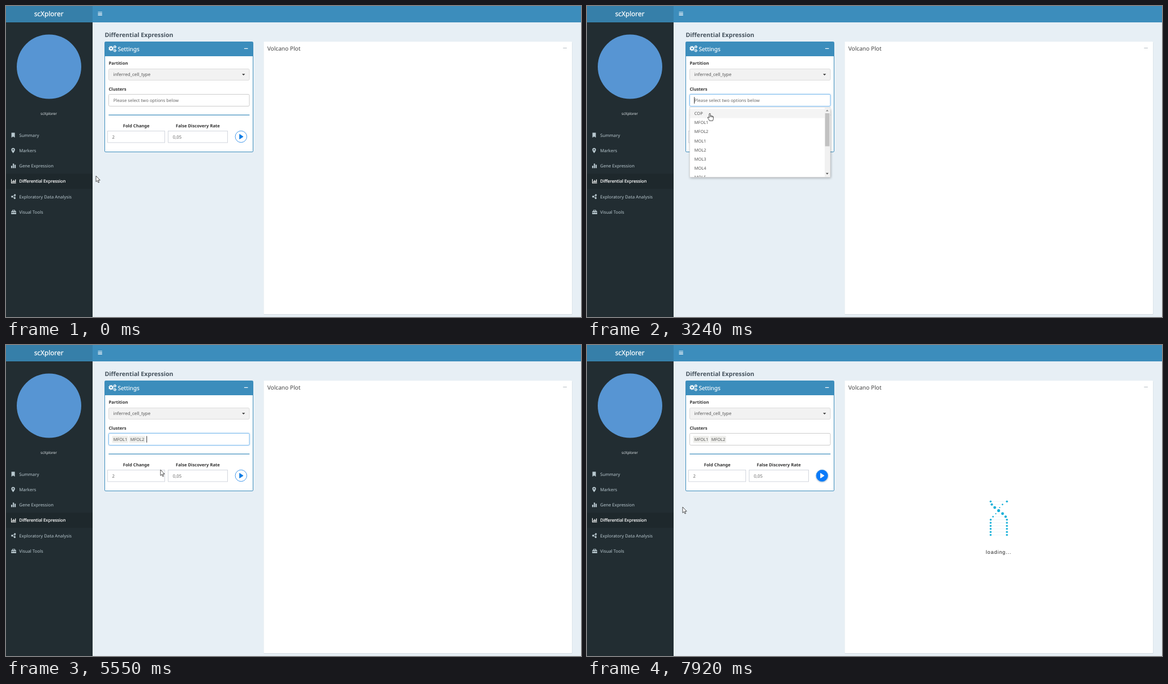
Animation of 1016 by 551 pixels, one loop 7.99 s. Source, as an HTML page:

```html
<!DOCTYPE html>
<html lang="en">
<head>
<meta charset="utf-8">
<title>Differential Expression</title>
<style>
html, body { margin: 0; width: 100%; height: 100%; overflow: hidden; background: #e7eff5; }
svg { display: block; width: 100vw; height: 100vh; }
text { font-family: "Noto Sans", "Open Sans", sans-serif; text-rendering: geometricPrecision; white-space: pre; }
.menu { font-size: 7.75px; fill: #b8c7ce; }
.menu.on { fill: #fff; stroke: #fff; stroke-width: .18; }
.label { font-size: 7.65px; font-weight: 700; fill: #333; }
.value { font-size: 7.75px; fill: #666; }
.option { font-size: 7.45px; fill: #555; }
.icon { fill: #b8c7ce; stroke: none; }
.field { fill: #fff; stroke: #d2d6de; }
</style>
</head>
<body>
<svg viewBox="0 0 1016 551" preserveAspectRatio="none">
  <defs>
    <filter id="soft" x="-20%" y="-20%" width="140%" height="150%"><feGaussianBlur stdDeviation="2.2"/></filter>
    <filter id="glow" x="-10%" y="-50%" width="120%" height="200%"><feGaussianBlur stdDeviation="1.1"/></filter>
    <clipPath id="listClip"><rect x="181" y="180" width="249" height="122.8"/></clipPath>
  </defs>

  <rect width="1016" height="551" fill="#e7eff5"/>
  <rect width="1016" height="29" fill="#3c8dbc"/>
  <rect y="29" width="153" height="522" fill="#222d32"/>
  <rect width="153" height="29" fill="#367fa9"/>
  <text x="49.7" y="18" font-size="11.8" fill="#fff" stroke="#fff" stroke-width=".25">scXplorer</text>
  <path d="M162.5 11h7.3M162.5 13.6h7.3M162.5 16.2h7.3" stroke="#fff" stroke-width="1.2"/>

  <circle cx="76" cy="107.5" r="57" fill="#5795d3"/>
  <text x="61" y="193.3" font-size="6.6" fill="#dfe5e8">scXplorer</text>
  <rect y="297" width="153" height="27" fill="#1e282c"/>
  <g id="menu"></g>
  <g class="icon">
    <path d="M9.6 224.6h6v8.6l-3-1.9-3 1.9z"/>
    <path fill-rule="evenodd" d="M12.6 260.8Q9.4 256.9 9.4 254.8A3.2 3.2 0 0 1 15.8 254.8Q15.8 256.9 12.6 260.8ZM12.6 253.5a1.2 1.2 0 1 0 .01 0z"/>
    <path d="M9 283h2.2v4.3H9zM12 279.2h2.2v8.1H12zM15 281.3h2.2v6H15z"/>
    <path fill="#fff" d="M9 306.7h1.1v6.5h7.6v1.1H9zM11 310.3h1.2v2.2H11zM12.7 308.6h1.2v3.9h-1.2zM14.4 309.7h1.2v2.8h-1.2zM16.1 307.2h1.2v5.3h-1.2z"/>
    <path d="M10.8 337.8L15.7 334.9L15.4 340.4Z" fill="none" stroke="#b8c7ce"/>
    <circle cx="10.8" cy="337.8" r="1.7"/><circle cx="15.7" cy="334.9" r="1.6"/><circle cx="15.4" cy="340.4" r="1.6"/>
    <path fill-rule="evenodd" d="M11.2 363v-1.8h4.8V363h1.2l.8 1.2V365H9.2v-.8L10 363zM12.2 363h2.8v-.9h-2.8zM9.2 365.8h2v.8h1v-.8h2.8v.8h1v-.8h2v3H9.2z"/>
  </g>

  <text x="174.5" y="54.6" font-size="10.65" font-weight="600" fill="#46535e">Differential Expression</text>

  <rect x="455.5" y="64" width="545" height="483" rx="1" fill="#d3dae0"/>
  <rect x="455.5" y="63.2" width="544.5" height="482.8" rx="1" fill="#fff"/>
  <text x="461.7" y="78.6" font-size="10.15" fill="#444">Volcano Plot</text>
  <path d="M984.3 74.5h6.6" stroke="#b5bbc2"/>

  <rect x="174.5" y="63.5" width="262" height="195" rx="1.6" fill="#fff" stroke="#3c8dbc"/>
  <rect x="175" y="64" width="261" height="25" fill="#3c8dbc"/>
  <g fill="none" stroke="#fff">
    <circle cx="185.6" cy="75.2" r="2.5" stroke-width="2.1"/>
    <circle cx="185.6" cy="75.2" r="3.9" stroke-width="1.3" stroke-dasharray="1.55 1.51"/>
    <circle cx="192.3" cy="72.4" r="1.5" stroke-width="1.2"/>
    <circle cx="192.3" cy="72.4" r="2.4" stroke-width=".9" stroke-dasharray="1.26 1.25"/>
    <circle cx="192.3" cy="79" r="1.5" stroke-width="1.2"/>
    <circle cx="192.3" cy="79" r="2.4" stroke-width=".9" stroke-dasharray="1.26 1.25"/>
    <path d="M420.9 75.4h6.5" stroke-width="1.2"/>
  </g>
  <text x="197.4" y="79.5" font-size="10.1" fill="#fff" stroke="#fff" stroke-width=".15">Settings</text>

  <text class="label" x="181.5" y="104.4">Partition</text>
  <rect x="181.5" y="111.5" width="248.5" height="20" rx="2" fill="#f2f2f2" stroke="#dcdcdc"/>
  <text class="value" x="189.6" y="124.3" style="font-size:7.95px;fill:#555">inferred_cell_type</text>
  <path d="M417 120.2h5.4l-2.7 2.8z" fill="#333"/>

  <text class="label" x="181.5" y="150.2">Clusters</text>
  <rect id="halo" x="181.5" y="156.5" width="248.5" height="21" rx="2" fill="none" stroke="#66afe9" stroke-width="1.6" opacity=".55" filter="url(#glow)"/>
  <rect id="box" x="181.5" y="156.5" width="248.5" height="21" rx="2" fill="#fff"/>
  <text id="hint" class="value" x="189.8" y="170">Please select two options below</text>
  <g id="chips"></g>
  <rect id="caret" y="161.3" width="1" height="11.6" fill="#333"/>

  <path d="M181.3 193.1H430.3" stroke="#3c8dbc" stroke-width="1.1"/>
  <text class="label" x="206.7" y="215">Fold Change</text>
  <text class="label" x="300" y="215">False Discovery Rate</text>
  <rect class="field" x="179.5" y="221.5" width="101" height="20.5"/>
  <rect class="field" x="286.5" y="221.5" width="105" height="20.5"/>
  <text class="value" x="187.4" y="235">2</text>
  <text class="value" x="294.8" y="235">0,05</text>

  <circle id="shade" cx="415.3" cy="232.4" r="10.9" fill="#5b7fa8" opacity=".45" filter="url(#glow)"/>
  <circle id="button" cx="415.3" cy="231.5" r="10.2" stroke="#2f8ee8" stroke-width=".9"/>
  <path id="play" d="M412.2 227.4Q412.2 226.6 413 227L419 230.9Q419.7 231.5 419 232.1L413 235.9Q412.2 236.3 412.2 235.5Z"/>

  <g id="list">
    <rect x="182" y="183" width="249" height="122" fill="#000" opacity=".28" filter="url(#soft)"/>
    <rect x="181.5" y="179.5" width="248.3" height="123.7" fill="#fff" stroke="#d4d4d4" stroke-width=".7"/>
    <rect id="active" x="182" width="238" height="16.2" fill="#f4f4f4"/>
    <g id="options" clip-path="url(#listClip)"></g>
    <rect x="420" y="180" width="9.4" height="122.8" fill="#f1f1f1"/>
    <rect id="thumb" x="420.7" y="190" width="7.8" fill="#c1c1c1"/>
    <path d="M422 186.5h4.8l-2.4-2.7z" fill="#8a8a8a"/>
    <path d="M422 295.8h4.8l-2.4 2.7z" fill="#505050"/>
  </g>

  <g id="loader">
    <g id="rows"></g>
    <text x="704.7" y="369.8" font-size="9" letter-spacing=".9" fill="#222" style="font-family:'Liberation Sans',Arial,sans-serif">loading...</text>
  </g>

  <g id="cursor">
    <path id="arrow" d="M0 0V10.4L2.4 8.2L4 12L5.6 11.3L4 7.6H7.2Z" fill="#fff" stroke="#222" stroke-width=".8"/>
    <path id="beam" d="M-2.3 -5Q-.4 -5 0 -4Q.4 -5 2.3 -5M0 -4V4M-2.3 5Q-.4 5 0 4Q.4 5 2.3 5" fill="none" stroke="#222" stroke-width=".9"/>
    <path id="hand" d="M-1.1 1.1Q0 -.9 1.1 1.1V4.6Q2.4 3.9 3.2 5Q4.4 4.4 5 5.5Q6.3 5.2 6.3 6.8V9.5Q6 11.5 5.2 13.3H-.6Q-1.5 11 -3.8 8Q-3.9 6.4 -2.2 7L-1.1 8.2ZM1.1 4.6V7M3.2 5V7.2M5 5.5V7.4" fill="#fff" stroke="#222" stroke-width=".8"/>
  </g>
</svg>
<script>
const LOOP = 7990, OPEN = 2160, PICK1 = 4130, PICK2 = 5080, HOVER = 6250, CLICK = 6870, LOAD = 6930;
const ROW = 16.1, DNA_ROWS = 12, BLINK = 530;
const $ = id => document.getElementById(id);

function add(parent, tag, attrs, text) {
  const el = document.createElementNS('http://www.w3.org/2000/svg', tag);
  set(el, attrs);
  if (text) el.textContent = text;
  return parent.appendChild(el);
}
function set(el, attrs) {
  for (const k in attrs) el.setAttribute(k, attrs[k]);
}
const show = (el, on) => el.setAttribute('visibility', on ? 'visible' : 'hidden');
const clamp = v => Math.max(0, Math.min(1, v));
const mix = (a, b, k) => a + (b - a) * k;

// time, x, y, cursor shape
const path = [
  [0, 159, 301, 'arrow'], [1000, 159, 301, 'arrow'], [1130, 176, 285, 'arrow'],
  [1270, 228, 238, 'arrow'], [1400, 258, 197, 'arrow'], [1480, 250, 176, 'beam'],
  [1560, 226, 167, 'beam'], [1630, 215, 165, 'beam'], [2290, 215, 165, 'beam'],
  [2360, 211, 163, 'beam'], [2620, 211, 163, 'beam'], [2760, 212, 167, 'beam'],
  [2960, 215, 181, 'hand'], [3240, 217, 190, 'hand'], [3450, 217, 197, 'hand'],
  [3800, 216, 204, 'hand'], [PICK2, 216, 204, 'arrow'], [5340, 216, 204, 'arrow'],
  [5410, 222, 206, 'arrow'], [5550, 273, 221, 'arrow'], [5750, 330, 246, 'arrow'],
  [5950, 380, 249, 'arrow'], [6180, 405, 243, 'arrow'], [HOVER, 409, 238, 'hand'],
  [6500, 411, 232, 'hand'], [7000, 411, 232, 'hand'], [7070, 400, 238, 'arrow'],
  [7300, 330, 262, 'arrow'], [7600, 240, 288, 'arrow'], [7850, 183, 292, 'arrow'],
  [7920, 169, 287, 'arrow']
];

function cursorAt(t) {
  let i = path.length - 1;
  while (path[i][0] > t) i--;
  const a = path[i], b = path[i + 1] || a;
  const k = b === a ? 0 : (t - a[0]) / (b[0] - a[0]);
  return { x: mix(a[1], b[1], k), y: mix(a[2], b[2], k), shape: a[3] };
}

['Summary', 'Markers', 'Gene Expression', 'Differential Expression', 'Exploratory Data Analysis', 'Visual Tools']
  .forEach((name, i) => {
    add($('menu'), 'text', { class: i === 3 ? 'menu on' : 'menu', x: 23.3, y: 231.8 + 27.2 * i }, name);
  });

const clusters = ['COP', 'MFOL1', 'MFOL2', 'MOL1', 'MOL2', 'MOL3', 'MOL4', 'MOL5', 'MOL6'];
const options = Array.from({ length: 8 }, (_, i) =>
  add($('options'), 'text', { class: 'option', x: 189.8, y: 193.2 + ROW * i }));

const chips = ['MFOL1', 'MFOL2'].map((name, i) => {
  const g = add($('chips'), 'g', { transform: `translate(${187.4 + 30 * i} 0)` });
  add(g, 'rect', { y: 161, width: 28.4, height: 12.4, rx: 1.5, fill: '#efefec' });
  add(g, 'text', { class: 'option', x: 2.3, y: 169.9 }, name);
  return g;
});

const strands = Array.from({ length: DNA_ROWS }, (_, i) => {
  const y = 277.2 + 5.4 * i;
  const rung = add($('rows'), 'line', { y1: y, y2: y, stroke: '#d5e6ee', 'stroke-width': .6, 'stroke-dasharray': '1.5 1' });
  const [back, front] = [0, 1].map(() => add($('rows'), 'circle', { cy: y, fill: '#17b0d8' }));
  return { rung, back, front };
});

const backSteps = [0, .14, .31, .48, .55, .72, 1];
function along(steps, u) {
  const p = u * (steps.length - 1), i = Math.min(Math.floor(p), steps.length - 2);
  return mix(steps[i], steps[i + 1], p - i);
}

function drawStrands(t) {
  strands.forEach(({ rung, back, front }, i) => {
    const u = clamp((t - LOAD - 164 * i) / 985);
    const swell = Math.sin(Math.PI * u);
    const xb = mix(713.2, 742, along(backSteps, u));
    const xf = mix(742, 713.2, u * u * (3 - 2 * u));
    set(back, { cx: xb, r: 1.75 - .75 * swell });
    set(front, { cx: xf, r: 1.75 + .8 * swell });
    set(rung, { x1: Math.min(xb, xf), x2: Math.max(xb, xf) });
  });
}

function caretOn(t) {
  if (t < OPEN || t >= CLICK) return false;
  const start = t >= 5210 ? 5210 : t >= 4330 ? 4330 : OPEN;
  return Math.floor((t - start) / BLINK) % 2 === 0;
}

function draw(t) {
  const c = cursorAt(t);
  set($('cursor'), { transform: `translate(${c.x} ${c.y})` });
  ['arrow', 'beam', 'hand'].forEach(s => show($(s), s === c.shape));

  const focus = t >= OPEN && t < CLICK;
  const picked = (t >= PICK1) + (t >= PICK2);
  show($('halo'), focus);
  set($('box'), { stroke: focus ? '#7fbcee' : '#ccc' });
  show($('hint'), picked === 0);
  chips.forEach((chip, i) => show(chip, i < picked));
  show($('caret'), caretOn(t));
  set($('caret'), { x: [189.2, 218, 248.2][picked] });

  show($('list'), t >= OPEN && t < PICK2);
  const names = picked ? clusters.filter(n => n !== 'MFOL1') : clusters;
  options.forEach((o, i) => { o.textContent = names[i]; });
  const row = c.shape === 'hand' ? Math.max(0, Math.floor((c.y - 182.3) / ROW)) : 0;
  set($('active'), { y: 182.3 + ROW * row });
  set($('thumb'), { height: picked ? 63.5 : 58.5 });

  const lit = t >= HOVER;
  show($('shade'), lit);
  set($('button'), { fill: lit ? '#0a7afa' : '#fff' });
  set($('play'), { fill: lit ? '#fff' : '#0d7ce4' });

  const loading = t >= LOAD;
  show($('loader'), loading);
  if (loading) drawStrands(t);
}

let begin;
function tick(now) {
  begin ??= now;
  draw((now - begin) % LOOP);
  requestAnimationFrame(tick);
}
draw(0);
requestAnimationFrame(tick);
</script>
</body>
</html>
```
